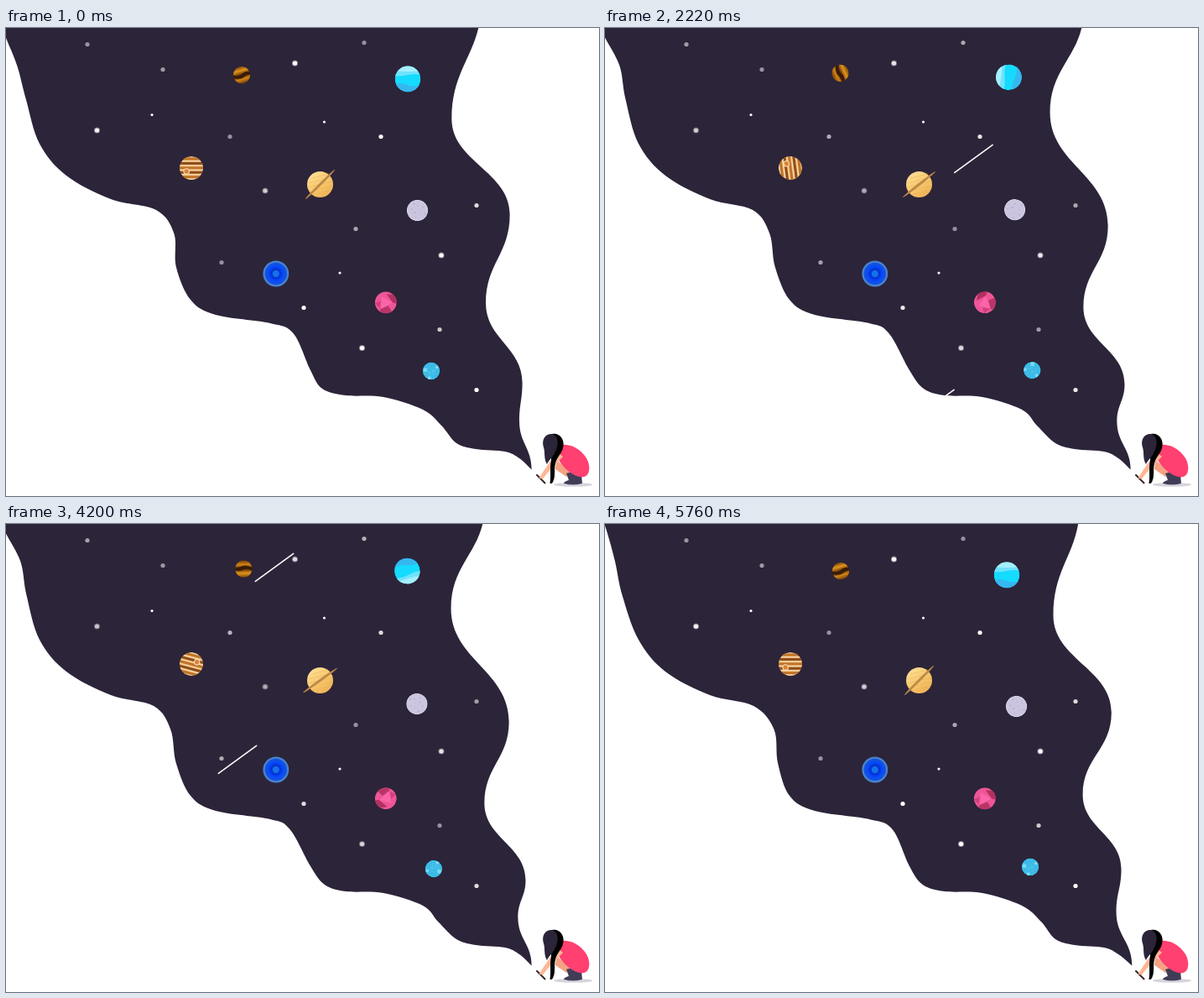
Recreate the animation shown at these times as an HTML page with a canvas. Size 707 by 558 pixels, loop 5790 ms.

```html
<!DOCTYPE html>
<html lang="en">
<head>
<meta charset="utf-8">
<title>Drawing the night sky</title>
<style>
  html, body { margin: 0; width: 100%; height: 100%; overflow: hidden; background: #fff; }
  canvas { display: block; }
</style>
</head>
<body>
<canvas id="stage" width="707" height="558"></canvas>
<script>
const ctx = document.getElementById('stage').getContext('2d');
const TAU = Math.PI * 2, DEG = Math.PI / 180;
const LOOP = 5790, STEP = 30, SPIN = 2880, PULSE = 1920, WAVE = 990, VOLLEY = 1440;

function disc(x, y, r, color) {
  ctx.fillStyle = color;
  ctx.beginPath();
  ctx.arc(x, y, r, 0, TAU);
  ctx.fill();
}

function shape(d, color) {
  ctx.fillStyle = color;
  ctx.fill(new Path2D(d));
}

function line(d, color, width) {
  ctx.strokeStyle = color;
  ctx.lineWidth = width;
  ctx.lineCap = 'round';
  ctx.stroke(new Path2D(d));
}

function gradient(x, y, ...colors) {
  const g = ctx.createLinearGradient(-x, -y, x, y);
  colors.forEach((c, i) => g.addColorStop(i / (colors.length - 1), c));
  return g;
}

function random(seed) {
  return () => (seed = seed * 16807 % 2147483647) / 2147483647;
}

// Scatters n round spots over a planet
function spots(n, seed, reach, size, color) {
  const rnd = random(seed);
  for (let i = 0; i < n; i++) {
    const a = i * 2.4, r = reach * Math.sqrt((i + .5) / n);
    disc(r * Math.cos(a), r * Math.sin(a), size * (.6 + .6 * rnd()), color);
  }
}

// ---- Sky: key points x, y and, where the edge sways, a phase in degrees ----

const LEFT = [
  [-9, -15, 280], [1.5, 10, 225], [15, 45, 125], [22, 85, 53], [40, 138], [72, 176],
  [125, 204], [176, 217, 0], [198.6, 245, -55], [205, 285, 225], [220, 324], [250, 342],
  [315, 352], [340, 364, -35], [363, 408], [380, 430, 180], [405, 438], [450, 440],
  [497, 455], [517, 474, -45], [537, 495], [560, 502], [595, 505], [612, 513]
];
const RIGHT = [
  [609.3, 465, 19], [618, 416, 146], [569.3, 327.5, 19],
  [602.2, 232.5, 238], [533, 104, 235], [569, -22, 135]
];

function sky(t) {
  const turn = t / WAVE * TAU;
  const swing = (size, phase) => size * Math.cos(turn - phase * DEG);
  const tip = [627.8 + swing(1.6, 224), 526.5];
  const left = LEFT.map(([x, y, phase]) =>
    [phase === undefined ? x : x + swing(3, phase), y]);
  left.push(tip);
  // Right bumps also ride up and down, lagging more with height
  const right = RIGHT.map(([x, y, phase], i) =>
    [x + swing(2.9, phase), y + swing(i % 2 ? 11 : 5.5, 45 + .0021 * (466 - y) ** 2)]);
  right[3][0] += 0;

  ctx.beginPath();
  ctx.moveTo(...left[0]);
  for (let i = 0; i < left.length - 1; i++) {
    const a = left[i], b = left[i + 1];
    const before = left[i - 1] || a, after = left[i + 2] || b;
    ctx.bezierCurveTo(
      a[0] + (b[0] - before[0]) / 6, a[1] + (b[1] - before[1]) / 6,
      b[0] - (after[0] - a[0]) / 6, b[1] - (after[1] - a[1]) / 6, b[0], b[1]);
  }
  // The right edge is vertical at every turning point
  let [x0, y0] = tip;
  for (const [x, y] of right) {
    const h = (y - y0) * .45;
    ctx.bezierCurveTo(x0, y0 + h, x, y - h, x, y);
    [x0, y0] = [x, y];
  }
  ctx.lineTo(x0, -60);
  ctx.lineTo(-9, -60);
  ctx.fillStyle = '#2c2439';
  ctx.fill();
}

// ---- Stars: x, y, glow; in the order in which they light up ----

const STARS = [
  [267, 129.5], [427, 17.5], [257, 279.5], [97, 19.5], [187, 49.5], [417, 239.5],
  [309, 194, 1], [517, 359.5], [561, 211.5], [108.5, 122, 1], [424.5, 381.5, 1],
  [344.5, 42, 1], [519, 271, 1], [447, 129.5], [355, 333.5], [561, 431.5]
];

function stars(t) {
  STARS.forEach(([x, y, glow], i) => {
    const k = Math.min(1, i / 14), delay = k * k * (3 - 2 * k) / 2;
    ctx.globalAlpha = .75 - .25 * Math.cos((t / PULSE - delay) * TAU);
    if (glow) disc(x, y, 3.6, 'rgba(255,255,255,.45)');
    disc(x, y, 2.6, '#fff');
  });
  ctx.globalAlpha = 1;
  for (const [x, y] of [[174, 103.5], [379.5, 112], [398, 292]]) disc(x, y, 1.6, '#fff');
}

// ---- Shooting stars: three set off together in each volley ----

function shootingStars(t) {
  if (t >= 4 * VOLLEY) return;
  for (let age = t % VOLLEY; age <= t; age += VOLLEY) {
    for (const [x, y] of [[697, -237], [653, -8], [607, 284]]) {
      line(`M${x - age * .3028} ${y + age * .2313}l45.3 -33`, '#fff', 1.6);
    }
  }
}

// ---- Planets ----

function jupiter() {
  disc(0, 0, 14, '#f0bd82');
  for (let i = 0; i < 5; i++) {
    const y = -12.5 + i * 5.4;
    ctx.fillStyle = i % 2 ? '#8f4d17' : '#bf7428';
    ctx.fillRect(-14, y, 28, 3);
    ctx.fillStyle = '#f8dcb4';
    ctx.fillRect(-14, y + 3.6, 28, .9);
  }
  disc(-5.8, 4, 3.8, '#f8dcb4');
  disc(-5.8, 4, 2.7, '#d98436');
}

function neptune() {
  disc(0, 0, 15.3, '#14dbff');
  shape('M-16 -16H16V-5Q8 -7 0 -5T-16 -4Z', '#6fe2fd');
  shape('M-16 -16H16V-10Q0 -8 -16 -10Z', '#a5effd');
  shape('M-16 6Q-8 4 0 7T16 6V16H-16Z', '#35b8f0');
}

function gold() {
  disc(0, 0, 10.3, gradient(3, 10, '#7a4008', '#e0951c', '#5c2c08', '#d08416', '#6a3608'));
  shape('M-11 0Q-4 3 0 -1T11 -4V-1Q5 0 2 3T-11 4Z', '#3a1b08');
}

function moon() {
  disc(0, 0, 12.7, '#d6d2e6');
  disc(0, 0, 11.8, '#cbc5df');
  spots(9, 7, 10, .9, '#aeaed0');
}

function gem() {
  disc(0, 0, 13, '#ee5598');
  shape('M-5 -7L8 0L-6 8Z', '#fb64a8');
  shape('M1 -10L14 -9V2L8 0Z', '#b2305f');
  shape('M-7 8L3 4L9 14H-6Z', '#b93568');
  shape('M-13 1L-6 -2L-7 7Z', '#d0407c');
}

function earth() {
  disc(0, 0, 10.3, '#3bbce8');
  spots(7, 11, 9, 2.2, 'rgba(165,238,247,.6)');
  spots(4, 5, 7, 1.6, 'rgba(25,150,215,.6)');
}

// pivot, offset from it, radius, direction, look
const PLANETS = [
  [282, 54.6, -1, 1.4, 10.3, -1, gold],
  [479, 58.4, 0, 2.5, 15.3, 1, neptune],
  [221, 167, 0, 0, 14, -1, jupiter],
  [490, 216, .5, 1.5, 12.7, -1, moon],
  [452.8, 327.2, 0, 0, 13, 1, gem],
  [508.6, 409.8, -1.6, -.9, 10.3, -1, earth]
];

function planets(t) {
  for (const [x, y, dx, dy, r, dir, look] of PLANETS) {
    ctx.save();
    ctx.translate(x, y);
    ctx.rotate(dir * t / SPIN * TAU);
    ctx.translate(dx, dy);
    ctx.beginPath();
    ctx.arc(0, 0, r, 0, TAU);
    ctx.clip();
    look();
    ctx.restore();
  }
  ['#4a83cf', '#1453dd', '#0b4df4', '#0240fa', '#0533c4', '#1370ee']
    .forEach((color, i) => disc(321.8, 293, 15.4 - 2.25 * i, color));
}

function saturn(t) {
  ctx.save();
  ctx.translate(374.5, 186.5);
  disc(0, 0, 15.5, gradient(9, 12, '#fcdc92', '#f7c96c', '#efb358'));
  for (let y = -10; y < 14; y += 5) {
    const half = Math.sqrt(200 - y * y);
    line(`M${-half} ${y + half * .25}L${half} ${y - half * .25}`, 'rgba(225,160,70,.3)', 1);
  }
  ctx.rotate((-30 - 15 * Math.cos(t / PULSE * TAU)) * DEG);
  ctx.beginPath();
  ctx.ellipse(0, 0, 25, 1.5, 0, 0, TAU);
  ctx.fillStyle = '#bd884a';
  ctx.fill();
  ctx.restore();
}

// ---- Crouching girl ----

function girl() {
  ctx.fillStyle = '#d5d4dc';
  ctx.beginPath();
  ctx.ellipse(676, 544.5, 23, 2.3, 0, 0, TAU);
  ctx.fill();
  line('M633 533L642.5 542.5', '#3a2420', 2);
  shape('M656 515L666 523L674 531L668 535L655 526Z', '#f3a384');
  shape('M668 531Q677 528 686 532L687 543Q676 546 665 543Q665 541 671 539Z', '#3f3d56');
  shape('M662 497C674 495 689 504 694 517C697 527 695 535 687 535.5C676 535 664 525 658 513Z', '#ff4070');
  shape('M659 507L664 511L650 525L640 537.5L635.5 537L641 528L648 518Z', '#ffb694');
  shape('M651 484C660 482 667 491 664 501C662 508 657 511 655 519C653 527 656 536 651 543L648.5 543C650 533 648 525 650 515Z', '#000');
  shape('M652 484C643 483 638 491 641 500C643 507 641 514 645 520C648 514 652 512 655 505C659 497 659 488 652 484Z', '#2c2439');
}

function draw(now) {
  const t = Math.floor(now % LOOP / STEP) * STEP;
  ctx.clearRect(0, 0, 707, 558);
  sky(t);
  stars(t);
  shootingStars(t);
  planets(t);
  saturn(t);
  girl();
}

const began = performance.now();
function tick() {
  draw(performance.now() - began);
  requestAnimationFrame(tick);
}
tick();
</script>
</body>
</html>
```
